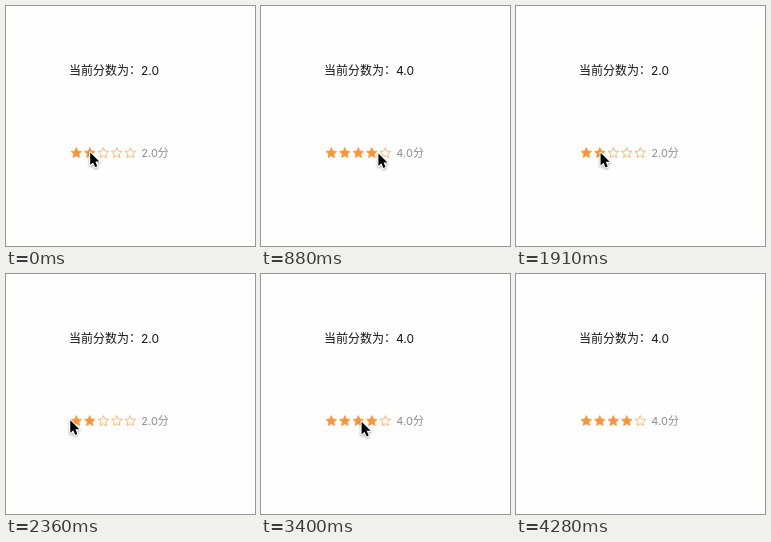
An HTML page that plays this animation: 249 by 240 pixels, repeating every 5080 ms.

```html
<!DOCTYPE html>
<html lang="zh-CN">
<head>
<meta charset="utf-8">
<title>评分</title>
<style>
  html, body { margin: 0; width: 100%; height: 100%; overflow: hidden; background: #fefefe; }
  svg { display: block; width: 249px; height: 240px; }
  text { font-family: Inter, "Noto Sans CJK SC", sans-serif; }
  .cjk { font-family: "Noto Sans CJK SC", "Noto Sans CJK", sans-serif; }
  #title { font-size: 12px; fill: #141414; text-anchor: middle; }
  #note { font-size: 11px; fill: #8c8c8c; }
  .star { stroke: #fda24e; stroke-width: .75; stroke-linejoin: round; fill: none; }
  .star.on { stroke: #fb9536; fill: #fb9536; }
  #cursor { filter: drop-shadow(0 1px .8px rgba(0, 0, 0, .35)); }
</style>
</head>
<body>
<svg viewBox="0 0 249 240" lang="zh-CN">
  <text id="title" x="108" y="69"><tspan class="cjk">当前分数为</tspan><tspan class="cjk" dy="-1">：</tspan><tspan class="score" dy="1"></tspan></text>
  <g id="stars"></g>
  <text id="note" x="135.3" y="151"><tspan class="score"></tspan><tspan class="cjk">分</tspan></text>
  <g id="cursor">
    <path d="M0 0V12.6L2.9 9.9L5 14.6L7.1 13.7L5.1 9H9.1Z"
          fill="#000" stroke="#fff" stroke-width="2.2" stroke-linejoin="round" paint-order="stroke"/>
  </g>
</svg>
<script>
const LOOP = 5080;
const STEP = 147.5;           // the picture advances in steps of this many ms
const LEFT = 64, PITCH = 13.5; // row of stars

// Pointer strokes: first step, steps taken, end x, end y
const strokes = [
  [0, 3, 96.6, 146.5], [3, 2, 111.3, 147], [5, 2, 117.6, 147.4], [8, 2, 122.6, 148.6],
  [11, 2, 84.6, 146.8], [14, 3, 64.2, 146.3], [18, 2, 115.1, 148.7], [22, 3, 98.4, 147.7],
  [26, 5, 147, 243]
];
const clicks = [0, 3, 6, 10, 13, 17, 21];

const starsBox = document.getElementById('stars');
const cursor = document.getElementById('cursor');
const labels = document.querySelectorAll('.score');

function starPoints(cx, cy, outer, inner) {
  return Array.from({ length: 10 }, (_, i) => {
    const r = i % 2 ? inner : outer;
    const a = (i / 5 - .5) * Math.PI;
    return (cx + r * Math.cos(a)).toFixed(2) + ',' + (cy + r * Math.sin(a)).toFixed(2);
  }).join(' ');
}

const stars = Array.from({ length: 5 }, (_, i) => {
  const star = document.createElementNS('http://www.w3.org/2000/svg', 'polygon');
  star.setAttribute('points', starPoints(LEFT + 6.3 + PITCH * i, 147.1, 5.5, 2.6));
  starsBox.appendChild(star);
  return star;
});

const easeOut = u => 1 - (1 - u) ** 5;

function pointer(step) {
  let x = 84.2, y = 146.5;
  for (const [from, count, endX, endY] of strokes) {
    const k = easeOut(Math.min(1, Math.max(0, (step - from) / count)));
    x += (endX - x) * k;
    y += (endY - y) * k;
  }
  return [x, y];
}

// A click rates with the star under the pointer
function rating(step) {
  const [x] = pointer(clicks.findLast(c => c <= step));
  return Math.min(5, Math.max(1, Math.ceil((x - LEFT) / PITCH)));
}

function draw(t) {
  const step = Math.floor((t + 8) / STEP);
  const score = rating(step);
  labels.forEach(el => { el.textContent = score.toFixed(1); });
  stars.forEach((el, i) => el.setAttribute('class', i < score ? 'star on' : 'star'));
  cursor.setAttribute('transform', `translate(${pointer(step)})`);
}

const start = performance.now();
function tick() {
  draw((performance.now() - start) % LOOP);
  requestAnimationFrame(tick);
}
draw(0);
requestAnimationFrame(tick);
</script>
</body>
</html>
```
